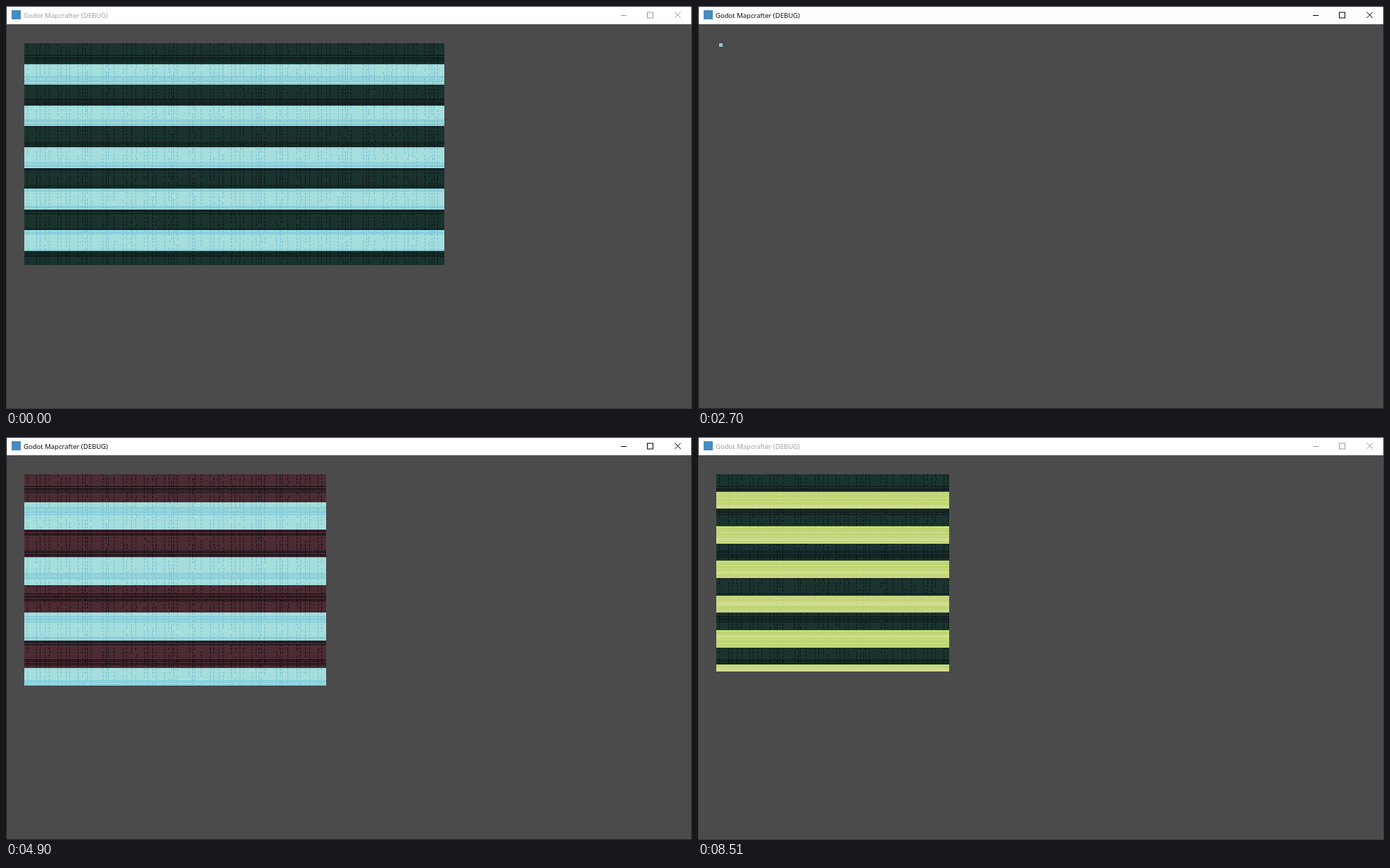
An HTML page with a canvas for the animation above (8.61 s loop, 975x574 px).

```html
<!DOCTYPE html>
<html lang="en">
<head>
<meta charset="utf-8">
<title>Godot Mapcrafter</title>
<style>
  html, body { margin: 0; width: 100%; height: 100%; overflow: hidden; background: #4b4b4b; }
  canvas { display: block; }
</style>
</head>
<body>
<canvas id="stage" width="975" height="574"></canvas>
<script>
const ctx = document.getElementById('stage').getContext('2d');
const LOOP = 8610, TILE = 4.9333, LEFT = 26, TOP = 53.05;

const GREEN = { base: '#1a332e', line: '#0c1518', dash: '#0a1114' };
const MAROON = { base: '#4c2b32', line: '#100d15', dash: '#100d15' };
const CYAN = { base: '#a5dedd', line: '#76c2d5', dash: '#70bcd3' };
const LIME = { base: '#cfdc8e', line: '#b0d05c', dash: '#b8d268', dense: true };

// Start time, columns, rows, band height in tiles, colours of the two bands.
// A time alone is the moment when only the first tile has been placed.
const maps = [
  [0, 121, 64, 6, GREEN, CYAN],
  [500, 122, 70, 7, GREEN, CYAN],
  [1400, 120, 65, 8, MAROON, CYAN],
  [1800],
  [1900, 111, 60, 6, GREEN, LIME],
  [2300, 96, 70, 9, GREEN, CYAN],
  [2700],
  [2800, 133, 87, 7, MAROON, LIME],
  [3100, 79, 50, 10, MAROON, CYAN],
  [3300],
  [3400, 147, 37, 6, GREEN, CYAN],
  [3700, 110, 32, 7, MAROON, CYAN],
  [3900, 139, 50, 9, GREEN, LIME],
  [4200, 73, 63, 6, MAROON, LIME],
  [4500, 68, 45, 7, GREEN, CYAN],
  [4900, 87, 61, 8, MAROON, CYAN],
  [5300, 119, 48, 6, GREEN, LIME],
  [5600, 88, 74, 7, MAROON, CYAN],
  [6000, 66, 52, 9, GREEN, CYAN],
  [6300],
  [6400, 72, 90, 5, MAROON, LIME],
  [6700, 141, 48, 8, GREEN, CYAN],
  [7010],
  [7110, 139, 45, 6, MAROON, LIME],
  [7410, 71, 26, 5, GREEN, CYAN],
  [7810, 60, 22, 7, MAROON, CYAN],
  [8110],
  [8210, 67, 57, 5, GREEN, LIME]
];

// Sampled columns repeat every 25 tiles.
const seams = [4, 17, 22, 29, 35, 47, 52, 59, 64, 76, 82, 86, 89, 94, 111, 116, 119];

function rect(color, x, y, w, h) {
  ctx.fillStyle = color;
  ctx.fillRect(x, y, w, h);
}

function noise(a, b) {
  const s = Math.sin(a * 12.9898 + b * 78.233) * 43758.5453;
  return s - Math.floor(s);
}

const rowTop = row => Math.round(TOP + row * TILE);

function hasLine(n, y, dense) {
  if (dense) return (y - 143 + 462.5) % 46.25 > 5;
  const phase = n % 25;
  return (phase >= 7 && phase <= 10) || (phase >= 19 && phase <= 23);
}

function drawMap([, cols, rows, band, dark, light]) {
  if (!cols) return rect('#92c4d2', 30, 53, 5, 5);
  const width = Math.round(cols * TILE);
  const toneAt = row => Math.floor(row / band) % 2 ? light : dark;

  for (let row = 0; row < rows; row++) {
    const tone = toneAt(row), y = rowTop(row);
    rect(tone.base, LEFT, y, width, rowTop(row + 1) - y);
    for (let period = 0; period < width; period += 25 * TILE) {
      seams.forEach((seam, i) => {
        const x = Math.round(period + seam), chance = noise(row, x);
        if (x >= width - 1 || chance < 0.12) return;
        const shift = chance > 0.92 ? 1 : 0;
        rect(tone.dash, LEFT + x + shift, y + i % 2, 1, tone.dense ? 1 : 3);
      });
    }
    for (const n of [row * 2, row * 2 + 1]) {
      const lineY = rowTop(n / 2);
      if (hasLine(n, lineY, tone.dense)) rect(tone.line, LEFT, lineY, width, 1);
    }
  }
}

function drawWindow(active) {
  const ink = active ? '#000' : '#999';
  rect('#4b4b4b', 0, 0, 975, 574);
  rect('#fff', 0, 0, 975, 26);
  ctx.lineWidth = 1;
  ctx.strokeStyle = active ? '#1f1f1f' : '#3a3a3a';
  ctx.strokeRect(0.5, 0.5, 974, 573);

  rect('#478cbf', 8, 6, 13, 13);
  ctx.font = '9.55px "Open Sans", "Noto Sans", sans-serif';
  ctx.textBaseline = 'alphabetic';
  ctx.fillStyle = ink;
  ctx.fillText('Godot Mapcrafter (DEBUG)', 25, 17);

  rect(ink, 874, 13, 8, 1);
  ctx.strokeStyle = ink;
  ctx.strokeRect(911.5, 9, 8, 8);
  ctx.beginPath();
  ctx.moveTo(950.5, 8.5);
  ctx.lineTo(959, 17);
  ctx.moveTo(959, 8.5);
  ctx.lineTo(950.5, 17);
  ctx.stroke();
}

let shown = '';
function frame() {
  const time = performance.now() % LOOP;
  const map = maps.filter(m => m[0] <= time).pop();
  const active = time >= 100 && time < 8510;
  const state = map[0] + ':' + active;
  if (state !== shown) {
    drawWindow(active);
    drawMap(map);
    shown = state;
  }
  requestAnimationFrame(frame);
}
frame();
</script>
</body>
</html>
```
